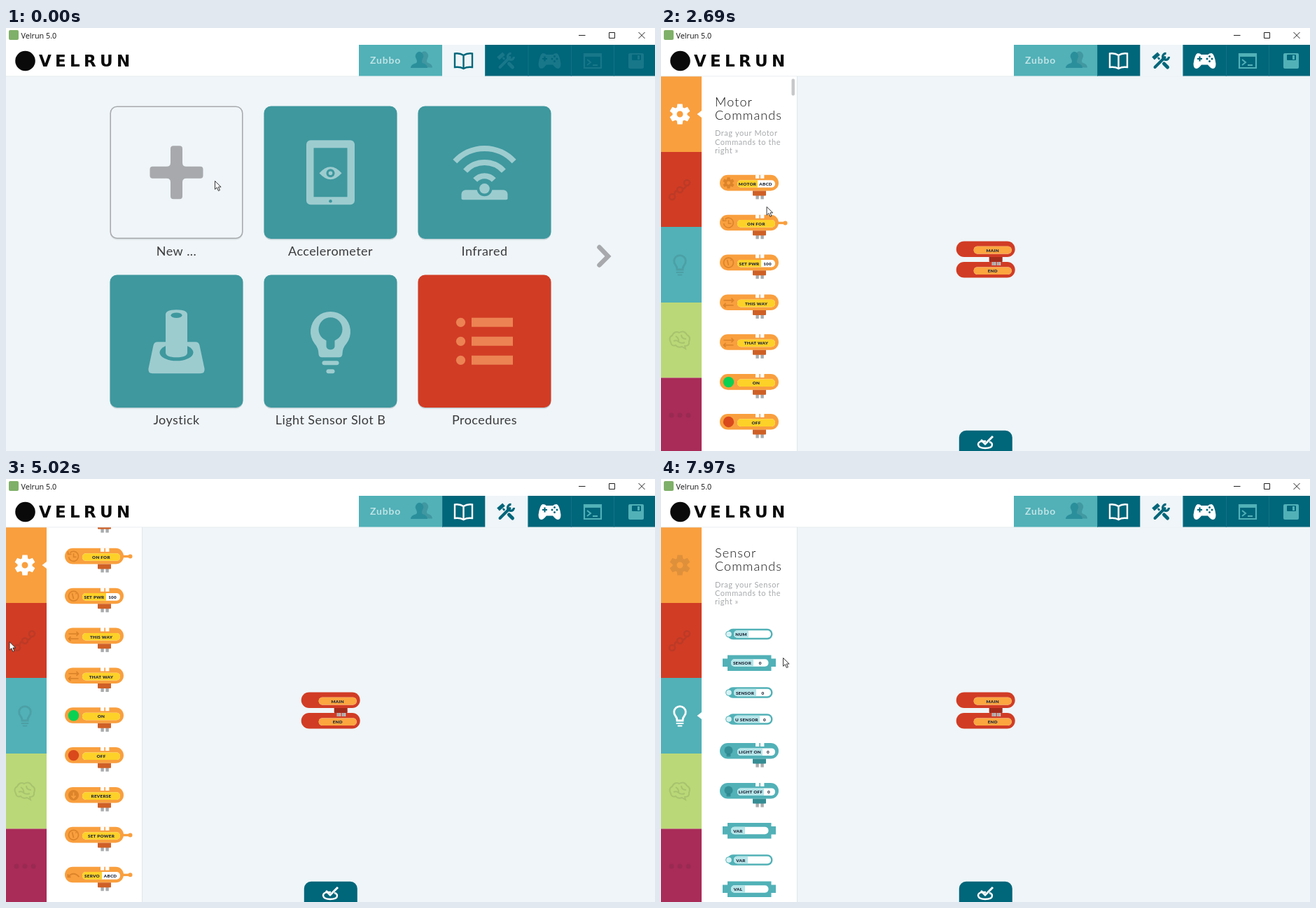
An HTML page with a canvas for the animation above (8 s loop, 927 by 604 pixels).

```html
<!DOCTYPE html>
<html lang="en">
<head>
<meta charset="utf-8">
<title>Block editor</title>
<style>
html, body { margin: 0; width: 100%; height: 100%; overflow: hidden; background: #eff5f8; }
canvas { display: block; }
</style>
</head>
<body>
<canvas id="stage" width="927" height="604"></canvas>
<script>
const c = document.getElementById('stage').getContext('2d');
const LOOP = 8000;
const BG = '#eff5f8', DARK = '#00667a', AQUA = '#51b1b7', CARD = '#3e989e', PALE = '#9dcccf';
const RED = '#d13c25', AMBER = '#f99f3e', GRAY = '#a7a9ac', INK = '#1f2838';
const LATO = 'Lato, sans-serif';

// Drawing helpers
function rect(x, y, w, h, color, r = 0) {
  c.fillStyle = color;
  c.beginPath();
  c.roundRect(x, y, w, h, r);
  c.fill();
}
function oval(x, y, rx, ry, color) {
  c.fillStyle = color;
  c.beginPath();
  c.ellipse(x, y, rx, ry, 0, 0, 7);
  c.fill();
}
const dot = (x, y, r, color) => oval(x, y, r, r, color);
function at(x, y, draw) {
  c.save();
  c.translate(x, y);
  draw();
  c.restore();
}
function fill(d, color) {
  c.fillStyle = color;
  c.fill(new Path2D(d), 'evenodd');
}
function stroke(d, color, width = 2, cap = 'butt') {
  c.strokeStyle = color;
  c.lineWidth = width;
  c.lineCap = cap;
  c.stroke(new Path2D(d));
}
function text(str, x, y, font, color, align = 'left', spacing = 0) {
  c.font = font;
  c.fillStyle = color;
  c.textAlign = align;
  c.letterSpacing = spacing + 'px';
  c.fillText(str, x, y);
}
const tiny = (str, x, y) => text(str, x, y, '900 6.3px ' + LATO, INK, 'center', 0.25);

// Timing helpers
const clamp = v => Math.max(0, Math.min(1, v));
const easeOut = (t, start, length) => 1 - (1 - clamp((t - start) / length)) ** 2;
const smooth = p => p * p * (3 - 2 * p);
function track(keys, t, ease = p => p) {
  const i = keys.findIndex(k => k[0] > t);
  if (i < 0) return keys.at(-1).slice(1);
  const [a, b] = [keys[i - 1], keys[i]];
  const p = ease((t - a[0]) / (b[0] - a[0]));
  return a.slice(1).map((v, j) => v + (b[j + 1] - v) * p);
}

// Icons, drawn around the origin
function gear(s, color) {
  c.beginPath();
  for (let i = 0; i < 6; i++) {
    for (const [da, r] of [[-.42, 10.5], [-.24, 15], [.24, 15], [.42, 10.5]]) {
      const a = i * Math.PI / 3 - Math.PI / 2 + da;
      c.lineTo(Math.cos(a) * r * s, Math.sin(a) * r * s);
    }
  }
  c.closePath();
  c.moveTo(4.5 * s, 0);
  c.arc(0, 0, 4.5 * s, 0, 7);
  c.fillStyle = color;
  c.fill('evenodd');
}
const tabIcons = [
  col => gear(1, col),
  col => stroke('M-7,10A4,4 0 1 1 -15,10A4,4 0 1 1 -7,10M4,0A4,4 0 1 1 -4,0A4,4 0 1 1 4,0M14,-10A4,4 0 1 1 6,-10A4,4 0 1 1 14,-10M-8,7Q-7,2 -4,1M4,-1Q8,-2 9,-6', col, 2.6),
  col => {
    stroke('M-4,7Q-4,3 -6.5,0A8.3,8.3 0 1 1 6.5,0Q4,3 4,7Z', col, 2.8);
    stroke('M-4.5,11H4.5M-2.5,14.5H2.5', col, 2, 'round');
  },
  col => stroke('M-13,3Q-17,-4 -11,-7Q-8,-14 -1,-11Q6,-15 10,-8Q16,-5 13,2Q14,8 7,8L8,12L3,9Q-3,11 -6,7Q-12,9 -13,3ZM-6,-6Q-1,-3 -2,2M2,-8Q2,-2 9,-2M-9,1Q-5,-1 -2,2Q2,5 7,3', col, 2),
  col => [-12, 0, 12].forEach(x => dot(x, 0, 3.5, col)),
];
const navIcons = [
  col => stroke('M0,-8Q-5,-11.5 -12.5,-10.5V9Q-5,8 0,11Q5,8 12.5,9V-10.5Q5,-11.5 0,-8V11', col, 2.4),
  (col, back) => {
    stroke('M-4,-4L9,9', col, 2.6, 'round');
    stroke('M4,4L9,9', col, 5, 'round');
    stroke('M-11.5,-3.5L-3.5,-10.5', col, 5.5);
    stroke('M-9,9L5,-5', back, 6.5, 'round');
    stroke('M-9,9L5,-5', col, 4, 'round');
    stroke('M7,-10.5A4.5,4.5 0 1 0 11,-6', col, 3.2);
  },
  (col, back) => {
    fill('M-10,-11Q-6,-11 -5,-9H5Q6,-11 10,-11Q14,-10 16,4Q16,11 12,11Q9,11 4.5,5.5H-4.5Q-9,11 -12,11Q-16,11 -16,4Q-14,-10 -10,-11Z', col);
    stroke('M-10.5,-3H-3.5M-7,-6.5V.5', back, 2.2);
    [[7, -6.5], [7, .5], [3.5, -3], [10.5, -3]].forEach(p => dot(...p, 1.5, back));
  },
  col => {
    stroke('M-12,-10H12V10H-12Z', col, 2.2);
    rect(-13, -11, 26, 5, col);
    stroke('M-8,-2L-3,2L-8,6M0,6H7', col, 2);
  },
  (col, back) => {
    rect(-11, -11, 22, 22, col, 2);
    rect(-6, -9, 13, 8, back, 1);
    rect(2, -8, 3, 6, col);
  },
];
const blockIcons = {
  gear: col => gear(.55, col),
  clock: col => stroke('M-5,-5A7,7 0 1 1 -7,1M-8,-7V-3H-3M0,-4V1H4', col, 1.6),
  gauge: col => stroke('M7,0A7,7 0 1 1 -7,0A7,7 0 1 1 7,0M0,4L-2,-4M3,-4L4,-3', col, 1.7),
  swap: col => stroke('M-7,-3H7M4,-6L7,-3L4,0M7,4H-7M-4,1L-7,4L-4,7', col, 1.7),
  on: () => dot(0, 0, 7.7, '#0ad152'),
  off: () => dot(0, 0, 7.7, '#d9491c'),
  reverse: col => { dot(0, 0, 7.5, col); stroke('M0,-4V4M-3,1L0,4L3,1', AMBER, 1.7); },
  servo: col => stroke('M-8,3Q0,-6 8,3M-8,-1V3H-4', col, 2),
  globe: col => { dot(0, 0, 7.7, col); stroke('M-5,-3L0,1L-2,6M2,-6L5,0', RED, 1.5); },
  bulb: col => { dot(0, -1, 6, col); rect(-3, 4, 6, 4, col, 1); },
};

// Command blocks
const themes = {
  motor: { body: AMBER, plug: '#cf6026', tag: '#fdd128', mark: 'rgba(160,75,0,.32)' },
  procedure: { body: RED, plug: '#a32c1c', tag: '#fba63f', mark: 'rgba(90,0,0,.3)' },
  sensor: { body: AQUA, plug: '#358d93', tag: '#b5e5e9', mark: 'rgba(0,80,90,.35)' },
};
function label(x, y, width, o, theme) {
  const split = o.split ?? width;
  rect(x, y, width, 10.6, '#fff', 5);
  if (split) rect(x, y, split, 10.6, theme.tag, split < width ? [5, 0, 0, 5] : 5);
  tiny(o.name, x + (split || width) / 2, y + 7.8);
  if (o.value) tiny(o.value, x + (split + width) / 2 - 1, y + 7.8);
}
function block(x, y, o, theme, back = '#fff') {
  if (o.arm) {
    rect(x + 80, y + 10, 14, 3.4, theme.body);
    dot(x + 93.5, y + 11.7, 3, theme.body);
  }
  rect(x, y, 84, 22.6, theme.body, 11.3);
  if (o.socket) {
    rect(x + 68, y, 28, 22.6, theme.body);
    rect(x + 89, y + 6, 7, 11, back);
  }
  for (const dx of [51, 58]) {
    if (o.notch !== false) rect(x + dx, y - .5, 5.4, 5.5, back);
    if (o.plug !== false) rect(x + dx + .4, y + 29, 4.4, 5.6, '#a9abad');
  }
  if (o.plug !== false) rect(x + 47, y + 22.6, 19, 7, theme.plug, [0, 0, 1, 1]);
  if (o.icon) at(x + 12.5, y + 11.5, () => blockIcons[o.icon](theme.mark));
  label(x + 25, y + 7.4, 54, o, theme);
}
function slot(y, o, theme) {
  if (o.kind === 'box') {
    rect(88, y - 6, 76, 11.5, theme.body);
    rect(95, y - 11, 62.5, 22.5, theme.body);
    label(100, y - 5.3, 53.5, o, theme);
  } else {
    rect(95, y - 7.7, 64.5, 15.4, theme.body, 7.7);
    dot(97, y, 4.8, theme.body);
    dot(97, y, 3.8, '#d8f2f4');
    label(104, y - 5.3, 53, o, theme);
  }
}

const panels = {
  motor: {
    title: 'Motor',
    items: [
      { name: 'MOTOR', split: 29, value: 'ABCD', icon: 'gear' },
      { name: 'ON FOR', icon: 'clock', arm: true },
      { name: 'SET PWR', split: 34, value: '100', icon: 'gauge' },
      { name: 'THIS WAY', icon: 'swap' },
      { name: 'THAT WAY', icon: 'swap' },
      { name: 'ON', icon: 'on' },
      { name: 'OFF', icon: 'off' },
      { name: 'REVERSE', icon: 'reverse' },
      { name: 'SET POWER', icon: 'gauge', arm: true },
      { name: 'SERVO', split: 28, value: 'ABCD', icon: 'servo', arm: true },
    ],
  },
  procedure: {
    title: 'Procedure',
    items: [
      { name: 'END', plug: false },
      { name: 'PROCEDURE', split: 0, notch: false },
      { name: 'CALL', split: 0 },
      { name: 'MAKE', split: 25, icon: 'globe' },
      { name: 'SET', split: 18, arm: true },
      { name: 'SET', split: 18, socket: true },
    ],
  },
  sensor: {
    title: 'Sensor',
    items: [
      { kind: 'pill', y: 221.5, name: 'NUM', split: 21 },
      { kind: 'box', y: 262.5, name: 'SENSOR', split: 32, value: '0' },
      { kind: 'pill', y: 305, name: 'SENSOR', split: 32, value: '0' },
      { kind: 'pill', y: 343, name: 'U SENSOR', split: 37, value: '0' },
      { y: 377, name: 'LIGHT ON', split: 36, value: '0', icon: 'bulb' },
      { y: 434, name: 'LIGHT OFF', split: 38, value: '0', icon: 'bulb' },
      { kind: 'box', y: 502, name: 'VAR', split: 20 },
      { kind: 'pill', y: 544, name: 'VAR', split: 20 },
      { kind: 'box', y: 585.5, name: 'VAL', split: 20 },
    ],
  },
};
function panel(key, scroll) {
  const { title, items } = panels[key], theme = themes[key];
  rect(58, 69, 136, 535, '#fff');
  rect(194, 69, 1, 535, '#dfe7eb');
  at(0, -scroll, () => {
    [title, 'Commands'].forEach((s, i) => text(s, 77, 112 + 19 * i, '300 18px ' + LATO, '#111', 'left', 1.1));
    [`Drag your ${title}`, 'Commands to the', 'right »'].forEach((s, i) =>
      text(s, 77, 154.5 + 12.2 * i, '11px ' + LATO, GRAY, 'left', .55));
    items.forEach((o, i) => o.kind ? slot(o.y, o, theme) : block(84, o.y ?? 210 + 56.85 * i, o, theme));
  });
}

// Screens
function header(editing) {
  rect(0, 0, 927, 69, '#fff');
  rect(0, 68.5, 927, .8, '#e2e8eb');
  rect(4, 3, 14, 14, '#7fb069', 2);
  text('Velrun 5.0', 21.5, 14.5, '10.8px "Open Sans", sans-serif', '#111');
  stroke('M818,10.5H827.5M861.5,6.5H869.5V14.5H861.5ZM903.5,6L912.5,15M912.5,6L903.5,15', '#222', 1);
  dot(27.5, 47, 14.3, '#0a0a0a');
  text('VELRUN', 47, 55, 'bold 23px "DejaVu Sans", sans-serif', '#0a0a0a', 'left', 5.3);

  rect(504, 24, 120, 44.5, AQUA);
  text('Zubbo', 520, 50.5, 'bold 14px ' + LATO, '#bfe3e5', 'left', .8);
  at(593, 46, () => {
    const user = 'M-15,11Q-15,6 -7,4Q-5,2 -7,-2A5.5,6.5 0 1 1 2,-2Q0,2 2,4Q9,6 9,11Z';
    at(7, -.5, () => fill(user, '#4198a1'));
    fill(user, '#2b8f9b');
  });
  [653.5, 714.5, 776.5, 838, 900].forEach((iconX, i) => {
    const active = i === (editing ? 1 : 0);
    const back = active ? BG : DARK;
    const x = 623 + 61.3 * i;
    rect(x, 24, 62, active ? 45 : 44.5, back);
    if (!active) rect(x, 24, .8, 44.5, '#17788a');
    const color = active ? DARK : !editing ? '#187789' : i > 2 ? AQUA : '#fff';
    at(iconX, 47, () => navIcons[i](color, back));
  });
}

const cardIcons = [
  () => {
    const p = 'M-8.5,-34Q-8.5,-38 -4.5,-38H4.5Q8.5,-38 8.5,-34V-14Q8.5,-8.5 14,-8.5H34Q38,-8.5 38,-4.5V4.5Q38,8.5 34,8.5H14Q8.5,8.5 8.5,14V34Q8.5,38 4.5,38H-4.5Q-8.5,38 -8.5,34V14Q-8.5,8.5 -14,8.5H-34Q-38,8.5 -38,4.5V-4.5Q-38,-8.5 -34,-8.5H-14Q-8.5,-8.5 -8.5,-14Z';
    fill(p, GRAY);
  },
  () => {
    rect(-34.5, -46, 69, 92, PALE, 6);
    rect(-24, -35, 48, 70, CARD);
    dot(0, 41, 2.3, CARD);
    fill('M-16,1Q0,-17 16,1Q0,19 -16,1Z', PALE);
    dot(0, 1, 6, CARD);
    dot(0, 1, 2.8, PALE);
  },
  () => {
    rect(-33, 25, 66, 14, PALE, [6, 6, 2, 2]);
    dot(0, 23, 11, CARD);
    dot(0, 23, 7.3, PALE);
    [57, 37, 18].forEach(r => {
      const e = r * .74;
      stroke(`M${-e},${23 - r * .68}A${r},${r} 0 0 1 ${e},${23 - r * .68}`, PALE, 8);
    });
  },
  () => {
    fill('M-27,1H27Q32,1 33,6L40,39Q41,46 34,46H-34Q-41,46 -40,39L-33,6Q-32,1 -27,1Z', PALE);
    oval(0, 16, 24, 12, CARD);
    fill('M-15.5,-38Q-15.5,-45 0,-45Q15.5,-45 15.5,-38V16Q15.5,23 0,23Q-15.5,23 -15.5,16Z', PALE);
    oval(0, -37, 8, 3.8, CARD);
  },
  () => {
    fill('M-17,18Q-17,10 -23,3A28.5,28.5 0 1 1 23,3Q17,10 17,18Q17,23 12,23H-12Q-17,23 -17,18Z', PALE);
    dot(0, -17, 17, CARD);
    rect(-6, -6, 12, 18, CARD, 5);
    rect(-12, 28, 24, 6, PALE, 3);
    rect(-6, 40, 12, 6, PALE, 3);
  },
  () => [-27, 0, 27].forEach(y => {
    dot(-34, y, 6.6, '#ec8353');
    rect(-18.5, y - 6.5, 59, 13, '#ec8353');
  }),
];
function gallery() {
  ['New ...', 'Accelerometer', 'Infrared', 'Joystick', 'Light Sensor Slot B', 'Procedures'].forEach((name, i) => {
    const x = 148.5 + i % 3 * 220, y = i < 3 ? 111.5 : 352.5;
    rect(x, y + 1.5, 190, 189.5, i ? '#c3d3d8' : '#dbe2e5', 10);
    rect(x, y, 190, 189.5, i === 0 ? GRAY : i === 5 ? RED : CARD, 10);
    if (!i) rect(x + 1.5, y + 1.5, 187, 186.5, BG, 8.5);
    at(x + 95, y + 94.8, cardIcons[i]);
    text(name, x + 95, y + 213, '18px ' + LATO, '#3b3b3d', 'center', .45);
  });
  stroke('M847.5,313L860,326L847.5,338.5', GRAY, 6.5, 'round');
}

const tabTops = [69, 177, 284, 392, 499.5, 604];
const tabColors = [AMBER, RED, AQUA, '#bad877', '#a92b58'];
const scrollKeys = [[0, 0], [2690, 0], [3080, 67], [3460, 125], [3780, 125], [4080, 168]];

function editor(t) {
  const out = 1 - easeOut(t, 630, 400);
  const active = t < 1840 ? -1 : t < 5260 ? 0 : t < 7180 ? 1 : 2;

  block(421.7, 334, { name: 'END', plug: false }, themes.procedure, BG);
  block(421.7, 304.4, { name: 'MAIN', notch: false }, themes.procedure, BG);

  at(0, out * 30, () => {
    rect(425.8, 574.7, 76, 30, DARK, [10, 10, 0, 0]);
    stroke('M464,590Q453,589 453,595Q454,600 463,600Q473,600 473,595Q473,592 469,591', '#fff', 2.4);
    stroke('M457,588L463,594L474,583', '#fff', 3);
  });

  if (active >= 0) {
    const slide = 136 * (1 - easeOut(t, 1840, 400));
    const scroll = active ? 0 : track(scrollKeys, t)[0];
    at(-slide, 0, () => panel(Object.keys(panels)[active], scroll));
    if (t >= 2690 && t < 5020) {
      c.globalAlpha = 1 - clamp((t - 4470) / 500);
      rect(186.5, 72 + scroll * 3.02, 4.5, 24, '#c6c8ca', 2);
      c.globalAlpha = 1;
    }
  }

  at(-58 * out, 0, () => tabColors.forEach((color, i) => {
    const top = tabTops[i];
    rect(0, top, 58, tabTops[i + 1] - top, color);
    at(27, [123, 231, 338, 446, 553][i], () => {
      tabIcons[i](i === active ? '#fff' : 'rgba(40,40,40,.12)');
      if (i === active && t > 2240) fill('M24.5,0L31,-5V5Z', '#fff');
    });
  }));
}

const cursorKeys = [
  [0, 298.5, 218.5], [140, 298.5, 218.5], [370, 279.5, 220], [980, 279.5, 220],
  [1370, 57, 116], [1440, 57, 116], [1540, 5, 114], [1670, 41.5, 112], [2100, 41.5, 112],
  [2620, 150, 256], [2900, 156.5, 252], [3200, 156.5, 252], [3460, 151, 252], [3540, 148, 252],
  [4000, 148, 252], [4320, 22, 240], [4470, 22, 240], [4800, 5, 232.5], [5340, 5, 232.5],
  [5640, 110, 310], [6020, 57, 377], [6090, 57, 377], [6160, 129, 240], [6390, 129, 240],
  [6700, 41.5, 338], [6760, 41.5, 338], [6880, 18, 345], [7030, 30, 341], [7260, 30, 341],
  [7700, 181, 262], [7940, 174.5, 255.5],
];
function cursor(t) {
  at(...track(cursorKeys, t, smooth), () => {
    const arrow = 'M0,0V11.8L2.8,9.2L4.9,14L6.9,13.1L4.9,8.5H8.6Z';
    fill(arrow, '#fff');
    stroke(arrow, '#222', .9);
  });
}

function frame(now) {
  const t = now % LOOP, editing = t >= 600;
  rect(0, 0, 927, 604, BG);
  if (editing) editor(t); else gallery();
  header(editing);
  cursor(t);
  requestAnimationFrame(frame);
}
requestAnimationFrame(frame);
</script>
</body>
</html>
```
